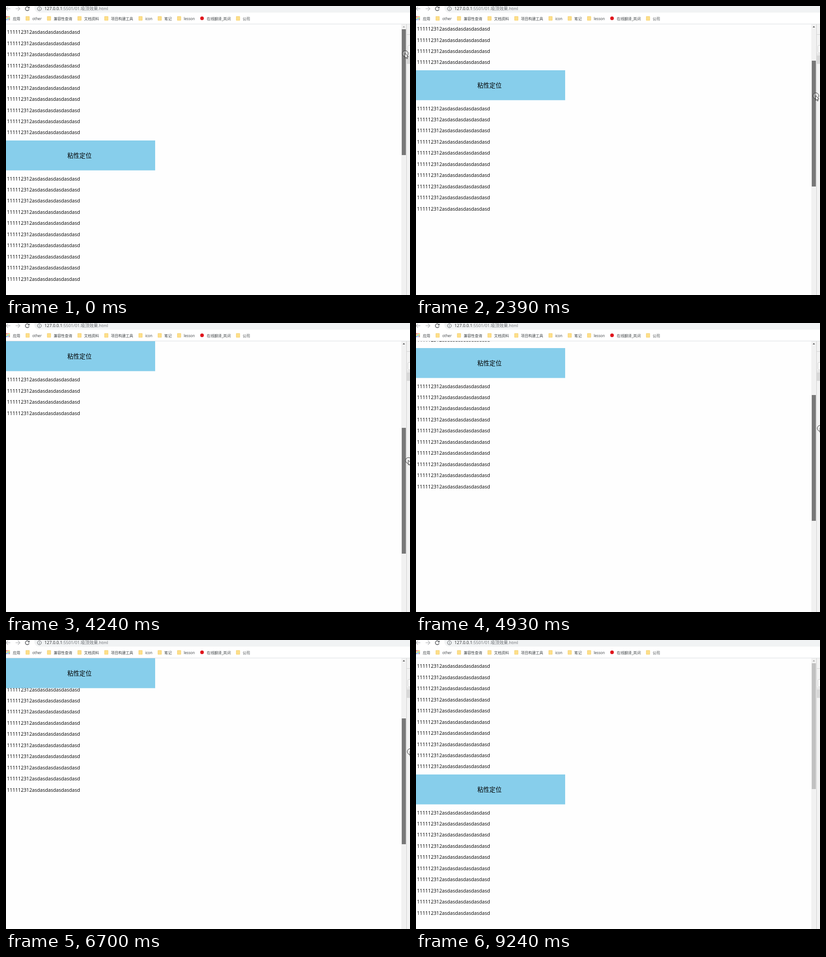
Write an HTML page with a canvas that moves like this. It is 883 px wide and 634 px high and loops after 9360 ms.

```html
<!DOCTYPE html>
<html lang="zh">
<head>
<meta charset="utf-8">
<title>吸顶效果</title>
<style>
html, body { margin: 0; width: 100%; height: 100%; overflow: hidden; background: #fff; }
canvas { display: block; }
</style>
</head>
<body>
<canvas id="stage" width="883" height="634"></canvas>
<script>
const ctx = document.getElementById('stage').getContext('2d');
const W = 883, H = 634, LOOP = 9360;
const CJK = '"Noto Sans CJK SC", "Noto Sans CJK", sans-serif';
const FONT = '"Open Sans", ' + CJK;
const VIEW_TOP = 40, BOX_TOP = 295, BOX_H = 65.6;
const ROWS = 10, ROW_GAP = 24.45;
const SCROLL_RATIO = 2.24, RELEASE = 8150, REST = 9040;

// Turning points of the drag: time, page scroll
const DRAG = [
  [60, 0], [690, 134], [910, 134], [1310, 0], [2390, 154], [3260, 261],
  [3580, 309], [3850, 309], [3980, 401], [4240, 401], [4930, 240],
  [5110, 213], [5270, 213], [5810, 354], [5980, 358], [7610, 159], [8090, 0]
];

const BOOKMARKS = ['other', '兼容性查询', '文档资料', '项目构建工具', 'icon', '笔记', 'lesson', '在线翻译_岚词', '公司'];
const MARKED = '在线翻译_岚词';

const clamp01 = v => Math.min(1, Math.max(0, v));

function scrollAt(t) {
  const i = DRAG.findIndex(([time]) => time > t);
  if (i <= 0) return 0;
  const [t0, s0] = DRAG[i - 1], [t1, s1] = DRAG[i];
  return s0 + (s1 - s0) * (t - t0) / (t1 - t0);
}

function pointerAt(t) {
  if (t < RELEASE) {
    // The hand leads the thumb a little and drifts off to the right
    const slack = 22 * clamp01(1 - t / 250);
    return [
      872.5 + 11 * clamp01(t / 4930) ** 2.8,
      126.3 + scrollAt(t + 35) / SCROLL_RATIO - slack
    ];
  }
  const p = clamp01((t - RELEASE) / (REST - RELEASE)), q = 1 - p;
  const exit = clamp01((t - REST - 60) / 140);
  const curve = (a, b, c) => q * q * a + 2 * p * q * b + p * p * c;
  return [curve(883, 715, 842) - 10 * exit, curve(126, 300, 614) + 26 * exit];
}

function rect(x, y, w, h, color) {
  ctx.fillStyle = color;
  ctx.fillRect(x, y, w, h);
}

function text(str, x, y, size, color, family = FONT) {
  ctx.font = `${size}px ${family}`;
  ctx.fillStyle = color;
  ctx.fillText(str, x, y);
  return x + ctx.measureText(str).width;
}

function paint(fill, stroke, width = 1) {
  if (fill) {
    ctx.fillStyle = fill;
    ctx.fill();
  }
  if (stroke) {
    ctx.strokeStyle = stroke;
    ctx.lineWidth = width;
    ctx.stroke();
  }
}

function path(points, fill, stroke, width) {
  ctx.beginPath();
  points.forEach(([x, y]) => ctx.lineTo(x, y));
  if (fill) ctx.closePath();
  paint(fill, stroke, width);
}

function arc(x, y, r, fill, stroke, width, from = 0, to = Math.PI * 2) {
  ctx.beginPath();
  ctx.arc(x, y, r, from, to);
  paint(fill, stroke, width);
}

function roundBox(x, y, w, h, r, fill, stroke) {
  ctx.beginPath();
  ctx.roundRect(x, y, w, h, r);
  paint(fill, stroke);
}

function navArrow(x, dir) {
  const tip = x + 4.5 * dir;
  path([[x - 5 * dir, 6], [tip, 6]], null, '#b5b7ba', 1.2);
  path([[x, 1.5], [tip, 6], [x, 10.5]], null, '#b5b7ba', 1.2);
}

function drawAddressBar() {
  roundBox(62, -8, 900, 22.5, 11, '#f1f3f4');
  navArrow(4.5, -1);
  navArrow(26, 1);
  arc(46.5, 6, 4.2, null, '#55585c', 1.4, 0.3, 5.5);
  path([[51.5, 1], [51.5, 5.2], [47.3, 5.2]], '#55585c');

  arc(73, 6, 4.3, null, '#5f6368');
  rect(72.5, 5.3, 1, 3.2, '#5f6368');
  rect(72.5, 3.3, 1, 1.1, '#5f6368');
  const hostEnd = text('127.0.0.1', 84, 9.4, 9.3, '#202124');
  text(':5501/01.吸顶效果.html', hostEnd, 9.4, 9.3, '#6a6e73');
}

function drawBookmarks() {
  const hues = ['#ea4335', '#fbbc05', '#34a853', '#4285f4'];
  for (let i = 0; i < 9; i++) {
    rect(i % 3 * 3.2, 22.5 + Math.floor(i / 3) * 3.2, 2, 2, hues[i >> 1 & 3]);
  }
  let x = text('应用', 15, 30.5, 8.1, '#3c4043') + 11.8;
  for (const label of BOOKMARKS) {
    if (label === MARKED) {
      arc(x + 4, 27, 4, '#e0161d');
    } else {
      roundBox(x, 22.5, 8.5, 9.5, 1, '#f5d06c');
      rect(x + 1, 23.5, 6.5, 8, '#fddf8b');
    }
    x = text(label, x + 14.4, 30.5, 8.1, '#3c4043') + 11.8;
  }
}

function drawToolbar() {
  rect(0, 0, W, VIEW_TOP, '#fff');
  drawAddressBar();
  drawBookmarks();
  rect(0, 39, W, 1, '#dcdee1');
}

function drawRows(y) {
  for (let i = 0; i < ROWS; i++) {
    text('111112312' + 'asd'.repeat(6), 2, y + i * ROW_GAP, 10.65, '#000');
  }
}

function drawPage(scroll) {
  ctx.save();
  ctx.beginPath();
  ctx.rect(0, VIEW_TOP, 864, H - VIEW_TOP);
  ctx.clip();
  rect(0, VIEW_TOP, 864, H - VIEW_TOP, '#fefefe');
  drawRows(61.4 - scroll);
  drawRows(382.5 - scroll);
  const top = Math.max(VIEW_TOP, BOX_TOP - scroll);
  rect(0, top, 326, BOX_H, '#87ceeb');
  text('粘性定位', 134, top + 38.2, 13.3, '#000', CJK);
  ctx.restore();
}

function drawSidePanel() {
  rect(875, VIEW_TOP, 8, H - VIEW_TOP, '#f3f3f3');
  rect(875, VIEW_TOP, 1, H - VIEW_TOP, '#cfcfcf');
  rect(876, 62, 7, 1, '#d0d0d0');
  roundBox(878.5, 86.5, 12, 16, 2, '#fafafa', '#cfcfcf');
  rect(876, 105, 7, 1, '#d0d0d0');
  rect(876, 108, 7, 19, '#d9d9d9');
}

function drawScrollbar(scroll, pressed) {
  rect(864, VIEW_TOP, 11, H - VIEW_TOP, '#f1f1f1');
  path([[867, 47], [869.5, 44], [872, 47]], scroll ? '#505050' : '#a3a3a3');
  const top = 51 + Math.round(scroll / SCROLL_RATIO);
  rect(865, top, 9, 276, pressed ? '#787878' : '#c1c1c1');
}

function drawPointer([x, y], pressed) {
  if (pressed) arc(x, y, 6.5, 'rgba(225,225,225,.35)', '#333');
  ctx.save();
  ctx.translate(x - 0.5, y - 0.5);
  path([[0, 0], [0, 10.5], [2.4, 8.4], [4, 12], [5.7, 11.2], [4.2, 7.7], [7.2, 7.5]], '#fff', '#111', 0.9);
  ctx.restore();
}

function draw(t) {
  const scroll = Math.round(scrollAt(t));
  const pressed = t < RELEASE;
  drawToolbar();
  drawPage(scroll);
  drawSidePanel();
  drawScrollbar(scroll, pressed);
  drawPointer(pointerAt(t), pressed);
}

const start = performance.now();
function tick(now) {
  draw(Math.max(0, now - start) % LOOP);
  requestAnimationFrame(tick);
}
draw(0);
requestAnimationFrame(tick);
</script>
</body>
</html>
```
